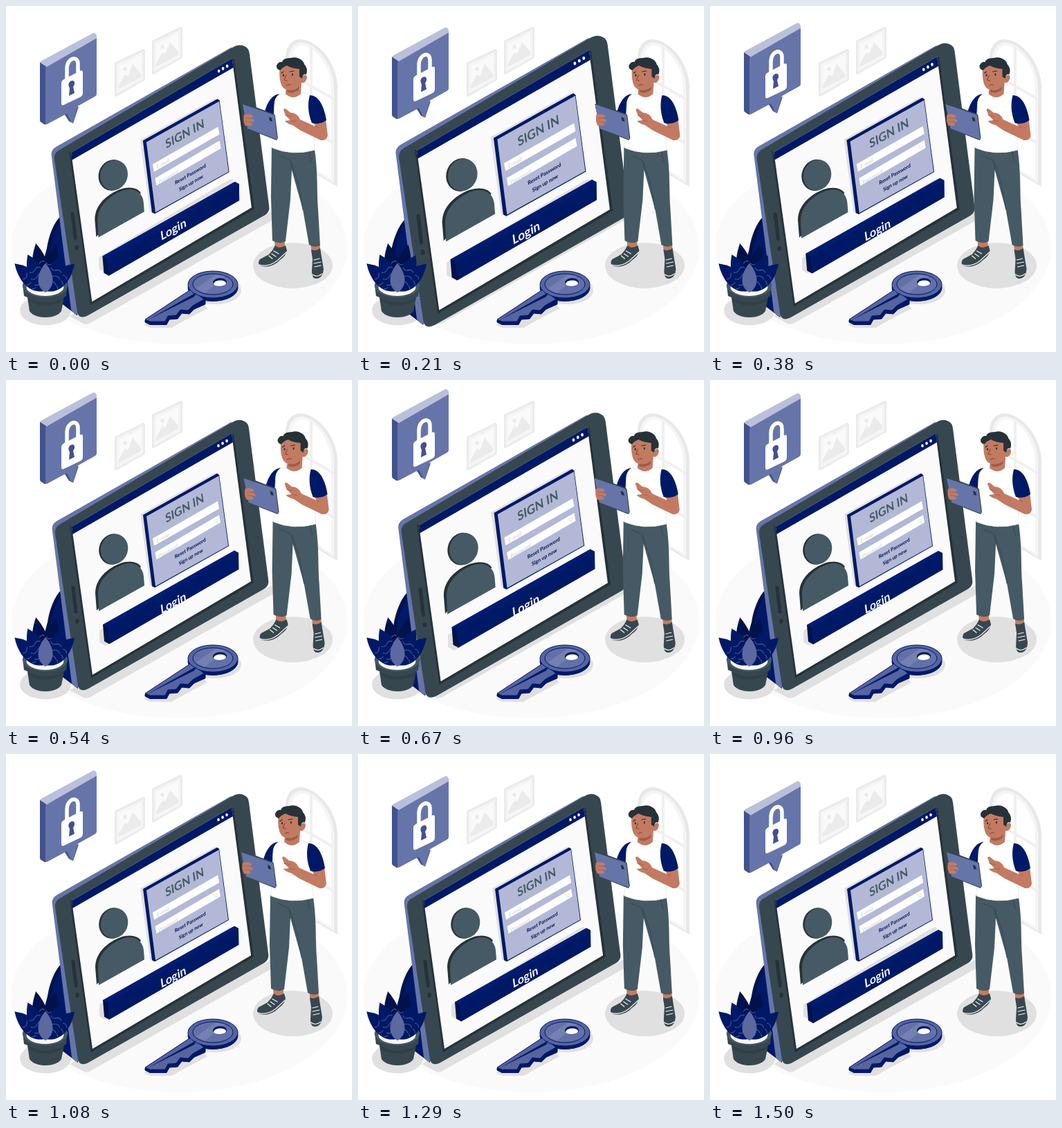
Animation of 500 by 500 pixels, one loop 1540 ms. Source, as an HTML page:

```html
<!DOCTYPE html>
<html lang="en">
<head>
<meta charset="utf-8">
<title>Sign in</title>
<style>
html, body { margin: 0; width: 100%; height: 100%; overflow: hidden; background: #fff; }
svg { display: block; width: 100vw; height: 100vh; }
text { font-family: Lato, "Open Sans", sans-serif; font-weight: 700; text-anchor: middle; }
.navy { fill: #001967; }
.deep { fill: #00124c; }
.slate { fill: #37474f; }
.ink { fill: #263238; }
.steel { fill: #455a64; }
.skin { fill: #c27b62; }
.blue { fill: #6675a9; }
.shade { fill: #e0e0e0; }
.line { fill: none; stroke-linecap: round; stroke-linejoin: round; }
</style>
</head>
<body>
<svg viewBox="0 0 500 500">
  <defs>
    <g id="frame">
      <path d="M0 20 41 0 44 1V45L2 69 0 68Z" fill="#ebebeb"/>
      <path d="M3 22 41 4V44L3 65Z" fill="#f5f5f5"/>
      <path d="M6 25 38 9V41L6 59Z" fill="#fafafa"/>
      <path d="M6 58V53L15 37 19 39 26 22 38 36V41Z" fill="#ebebeb"/>
      <ellipse cx="15" cy="29" rx="2.5" ry="3" fill="#ebebeb"/>
    </g>
    <g id="leaf">
      <path d="M0 0C-14-12-14-36 0-60C14-36 14-12 0 0Z"/>
      <path class="line" stroke="#5d6ba3" stroke-width=".8" d="M-8-15q4 5 8 0t8 0M-9-25q4 5 9 0t9 0M-7-35q3 4 7 0t7 0"/>
    </g>
  </defs>

  <ellipse cx="250" cy="349" rx="243" ry="140" fill="#fafafa"/>
  <use href="#frame" x="157" y="62"/>
  <use href="#frame" x="211" y="30"/>

  <!-- window -->
  <path d="M404 218V76C404 50 422 43 440 52C463 64 479 91 479 118V261Z" fill="#e8e8e8"/>
  <path d="M408 216V78C408 55 424 48 439 56C459 66 474 92 474 118V256Z" fill="#f5f5f5"/>
  <path d="M412 214V80C412 60 425 53 438 60C456 69 470 95 470 119V250Z" fill="#fff"/>
  <path class="line" stroke="#f0f0f0" stroke-width="4" d="M441 61V236M412 99 471 133M412 163 471 197"/>

  <!-- ground shadows -->
  <path class="shade" d="M92 448 112 459Q117 461 122 458L386 309Q390 304 384 297Z"/>
  <ellipse class="shade" cx="57" cy="440" rx="37" ry="21.500"/>
  <ellipse class="shade" cx="414.500" cy="375" rx="57.500" ry="33"/>

  <g id="tablet">
    <path class="deep" d="M80 303C70 313 63 331 60 350L46 402 104 446Z"/>
    <path class="navy" d="M82 308C74 318 67 333 65 351L53 404 104 444Z"/>
    <path class="blue" d="M67 218Q65 209 73 204L325 61 334 70 110 444 100 444 95 438Z"/>
    <path class="slate" d="M71 222Q70 213 77 209L327 61Q337 55 345 60Q350 62 351 70L379 288Q381 297 373 302L119 446Q107 452 104 442Z"/>
    <path class="ink" d="M92 210 95 212 125 426 354 291 326 77 329 78 358 293 123 431Z"/>
    <path d="M95 212 326 77 354 291 125 426Z" fill="#fafafa"/>
    <path class="navy" d="M95 212 326 77 328 90 96 223Z"/>
    <g fill="#fff">
      <ellipse cx="307" cy="95" rx="1.800" ry="2.300"/>
      <ellipse cx="313" cy="91.500" rx="1.800" ry="2.300"/>
      <ellipse cx="319" cy="88" rx="1.800" ry="2.300"/>
    </g>
    <path class="line" stroke="#263238" stroke-width="5" d="M97 300 101 335"/>
    <ellipse class="ink" cx="103" cy="348.500" rx="2.700" ry="3.400"/>

    <!-- avatar -->
    <g transform="translate(1 0)">
      <path class="ink" d="M130 333 128 308C128 287 146 272 164 265C178 260 190 263 194 270Z"/>
      <path class="steel" d="M133 334 132 309C132 289 149 274 167 267C184 261 197 269 198 284L199 297Z"/>
      <ellipse class="ink" cx="153.500" cy="244.500" rx="20" ry="22.500" transform="rotate(20 153.500 244.500)"/>
      <ellipse class="steel" cx="155.500" cy="244.500" rx="19.500" ry="22" transform="rotate(20 155.500 244.500)"/>
    </g>

    <!-- sign-in card -->
    <path class="shade" d="M194 194 302 134 306 137 213 299 208 297Z"/>
    <path class="navy" d="M198 195 305 135 308 137 322 240 215 300 211 298Z"/>
    <path d="M203 197 307.500 138.500 321 239.500 216 298Z" fill="#b2b8d6"/>
    <path d="M212 229 306 175 308 186 214 239.500Z" fill="#fff"/>
    <path d="M215.500 249 308 195 310 206 217.500 259.500Z" fill="#fff"/>
    <text class="steel" font-size="17.500" transform="matrix(.87 -.49 .14 .97 259 191)">SIGN IN</text>
    <g font-size="7.500" fill="#d9d9d9" font-weight="400">
      <text transform="matrix(.87 -.5 .14 .97 227 230.500)">E-mail</text>
      <text transform="matrix(.87 -.5 .14 .97 235 249.500)">Password</text>
    </g>
    <ellipse cx="303" cy="204" rx="2.500" ry="2" fill="none" stroke="#e8e8e8" transform="rotate(-30 303 204)"/>
    <g font-size="7.300" fill="#00124c">
      <text transform="matrix(.87 -.5 .14 .97 266.500 245.500)">Reset Password</text>
      <text transform="matrix(.87 -.5 .14 .97 267.500 258)">Sign up now</text>
    </g>

    <!-- login button -->
    <path class="shade" d="M135 362 322 251 327 250 330 274 143 384 135 379Z"/>
    <g id="button">
      <path class="deep" d="M140 361 330 254 336 257 336 281 149 389 142 385Z"/>
      <path d="M140 361 330 254 336 257.500 147 365Z" fill="#001d72"/>
      <path class="navy" d="M147 365 336 257.500 336.500 281 149 389Z"/>
    </g>
    <text font-size="17.500" fill="#fff" transform="matrix(.87 -.49 .14 .97 242.500 328)">Login</text>
  </g>

  <!-- plant -->
  <path class="slate" d="M24 402 26 419 31 421 34 441C42 453 72 453 80 441L84 421 87 419 89 402Z"/>
  <path class="ink" opacity=".35" d="M31 421Q57 436 84 421L83 426Q57 440 32 426Z"/>
  <ellipse class="steel" cx="56.500" cy="404" rx="32.500" ry="17"/>
  <ellipse cx="56.500" cy="406" rx="27" ry="13" fill="#f7f7f7"/>
  <g class="deep">
    <use href="#leaf" transform="translate(56 412) rotate(-10.500) scale(1.150 1.170)"/>
    <use href="#leaf" transform="translate(57 412) rotate(13) scale(1.150 1.150)"/>
  </g>
  <g class="navy">
    <use href="#leaf" transform="translate(55 412) rotate(-47) scale(1.150 .97)"/>
    <use href="#leaf" transform="translate(58 412) rotate(46) scale(1.150 .95)"/>
    <use href="#leaf" transform="translate(56 412) rotate(-25) scale(1.200 .97)"/>
    <use href="#leaf" transform="translate(57 412) rotate(27) scale(1.200 .97)"/>
  </g>
  <use href="#leaf" transform="translate(57 414) scale(1 .71)" fill="#5b699f"/>

  <!-- key -->
  <g class="shade" transform="translate(3 5)">
    <ellipse cx="300" cy="406" rx="37" ry="20"/>
    <path d="M268 411 196 456 206 460H236L254 450 288 432Z"/>
  </g>
  <g class="navy" stroke="#001967">
    <ellipse cx="299" cy="407" rx="36" ry="19.500"/>
    <path d="M268 410 201 454V457L208 460.500H232L236 453 248 452 254 444 265 445 272 438 288 431V420Z"/>
  </g>
  <g fill="#5664a0" stroke="#001967">
    <path d="M268 409 201 453 208 456H230L234 448 246 447 252 439 263 440 270 433 286 424Z"/>
    <ellipse cx="299" cy="402.500" rx="36" ry="19.500"/>
    <ellipse cx="299" cy="402" rx="29" ry="15" fill="#6371a8"/>
  </g>
  <path d="M272 420 204 454 275 414Z" class="navy"/>
  <path d="M275 408 303 388 317 390 287 415Z" fill="#8c96c0" opacity=".4"/>
  <path class="navy" d="M299 400C299 391 320 391 319 400C317 407 300 407 299 400Z"/>
  <path d="M300 402C301 395 318 395 318 401C316 406 302 406 300 402Z" fill="#fff"/>

  <!-- speech bubble -->
  <g id="bubble">
    <path d="M49 83Q49 81 51 80L125 40Q127 39 129 40L131 43V49L58 91Z" fill="#bac0da"/>
    <path d="M49 82 58 88V171L56 172 50 168Q49 167 49 165Z" fill="#43518c"/>
    <path d="M84 156 91 167 97 170 105 146Z" fill="#43518c"/>
    <path class="blue" d="M58 89 131 47V127Q131 130 129 131L104 145 97 169Q96 171 94 168L88 156 60 171Q57 173 57 170V91Z"/>
  </g>
  <g id="lock">
    <path class="line" stroke="#fff" stroke-width="5.500" stroke-linecap="butt" d="M88 107V91C88 75 104 71 104 84V98"/>
    <path d="M80 112Q80 108 84 106L107 94Q111 92 111 96V126Q111 130 107 132L84 143Q80 145 80 141Z" fill="#fff"/>
    <path d="M92 119C88 113 92 108 96 108C100 108 100 114 97 117L99 126 91 130Z" fill="#43518c"/>
  </g>

  <g id="man">
    <path class="skin" d="M388 336H403L403 352 389 354ZM440 341H453L455 357 442 358Z"/>
    <path class="slate" d="M389 346Q394 352 404 346L406 353Q405 361 396 367C389 375 377 379 367 375Q363 371 367 366L380 359Q386 353 389 346Z"/>
    <path class="slate" d="M441 352Q448 355 454 350L456 362 459 380Q458 393 449 394Q442 394 442 384L443 366Z"/>
    <path class="line" stroke="#f5f5f5" stroke-width="1.200" d="M366 374Q379 378 392 368L405 356M380 361 385 365M384 358 390 362M387 354 394 358M443 388Q449 393 457 387M445 367 453 365M445 372 455 370M446 377 455 375"/>
    <path class="steel" d="M384 204 446 207C451 242 449 263 451 293L454 346Q446 350 438 345L429 294 413 237 411 280 404 340Q395 345 385 339L383 276Z"/>
    <path class="line" stroke="#37474f" d="M413 236 411 223 395 216M429 294 423 259 412 225M438 211 441 224"/>

    <path class="skin" d="M380 149 374 158 381 178 394 169Z"/>
    <path class="navy" d="M395 127C382 129 377 143 374 152Q381 161 389 161Z"/>
    <path d="M396 127Q414 132 430 125L441 129 444 153 446 208Q414 217 385 205L388 143Q388 132 396 127Z" fill="#fff" stroke="#ebebeb"/>
    <path class="skin" d="M406 112H427L426 127Q415 137 404 127Z"/>
    <path d="M407 120Q416 124 424 115L423 121Q414 128 406 124Z" fill="#9d5c49"/>

    <!-- hand-held device -->
    <path class="slate" d="M342 142 345 140 387 156Q389 157 389 159L393 191 391 194 350 178Z"/>
    <path class="blue" d="M342 142 386 157Q388 158 388 160L392 193 349 177Z"/>
    <path class="ink" d="M380 160 384 162 385 167 381 166Z"/>
    <path class="skin" d="M344 157Q351 155 356 158L357 161 351 162 358 164 359 168 352 167 356 170 355 173 346 173Q342 166 344 157Z"/>
    <path class="line" stroke="#9d5c49" stroke-width=".7" d="M346 162H352M347 167H353"/>

    <!-- pointing arm -->
    <path class="skin" d="M443 165 462 163 465 187Q464 195 455 194L426 180 414 172Q406 170 403 166L411 165 404 158 401 150Q402 147 405 149L411 154Q421 154 425 164L447 174Z"/>
    <path class="line" stroke="#9d5c49" stroke-width=".8" d="M411 165 419 167M404 158 413 160M447 174 452 176"/>
    <path class="navy" d="M439 129C453 129 460 147 463 165Q454 172 442 169C436 154 436 140 439 129Z"/>

    <!-- head -->
    <path class="skin" d="M396 84 426 83 429 101Q435 97 435 104Q433 112 427 111C424 120 414 123 406 121Q399 119 397 111Q394 101 396 84Z"/>
    <path class="ink" d="M396 93Q390 91 391 86Q394 80 399 81Q400 75 412 75C422 72 431 80 431 84Q437 90 434 99Q429 97 428 105L424 102 424 91Q412 90 406 86Q400 88 396 93Z"/>
    <path class="line" stroke="#263238" stroke-width="1.200" d="M398 97 401 95M410 95 416 94"/>
    <ellipse class="ink" cx="401" cy="100" rx="1.100" ry="1.700"/>
    <ellipse class="ink" cx="414" cy="99" rx="1.100" ry="1.700"/>
    <path class="line" stroke="#7d3f32" d="M405 100 402 107 406 108M405 115Q408 112 411 114"/>
  </g>
</svg>
<script>
const LOOP = 1540, STEPS = 37, STEP = LOOP / STEPS;
const beat = [[0, 1], [.1, 1.1], [.3, 1], [.4, 1], [.5, 1.1], [.6, 1], [1, 1]];
const shake = [[0, 0], [.1, -1], [.2, 2], [.3, -4], [.4, 4], [.5, -4], [.6, 4], [.7, -4], [.8, 2], [.9, -1], [1, 0]];
const rise = [[0, 0], [.5, -1], [1, 0]];

// Linear interpolation through [position, value] pairs
function at(track, p) {
  const i = Math.max(1, track.findIndex(k => k[0] >= p));
  const [p0, v0] = track[i - 1], [p1, v1] = track[i];
  return v0 + (v1 - v0) * (p - p0) / (p1 - p0);
}

const [tablet, button, bubble, lock, man] =
  ["tablet", "button", "bubble", "lock", "man"].map(id => document.getElementById(id));
const move = (el, x, y) => el.setAttribute("transform", `translate(${x} ${y})`);

function draw(ms) {
  // Held at about 24 pictures per second
  const step = Math.floor((ms % LOOP + 4) / STEP) % STEPS;
  const p = Math.min(1, (step * STEP + 10) / 1490);
  const lift = at(rise, p);
  tablet.setAttribute("transform", `translate(225 251) scale(${at(beat, p)}) translate(-225 -251)`);
  move(button, 0, lift * 10);
  move(bubble, 0, lift * 29);
  move(lock, 0, lift * 20);
  move(man, at(shake, p), 0);
}

const start = performance.now();
function tick() {
  draw(performance.now() - start);
  requestAnimationFrame(tick);
}
tick();
</script>
</body>
</html>
```
